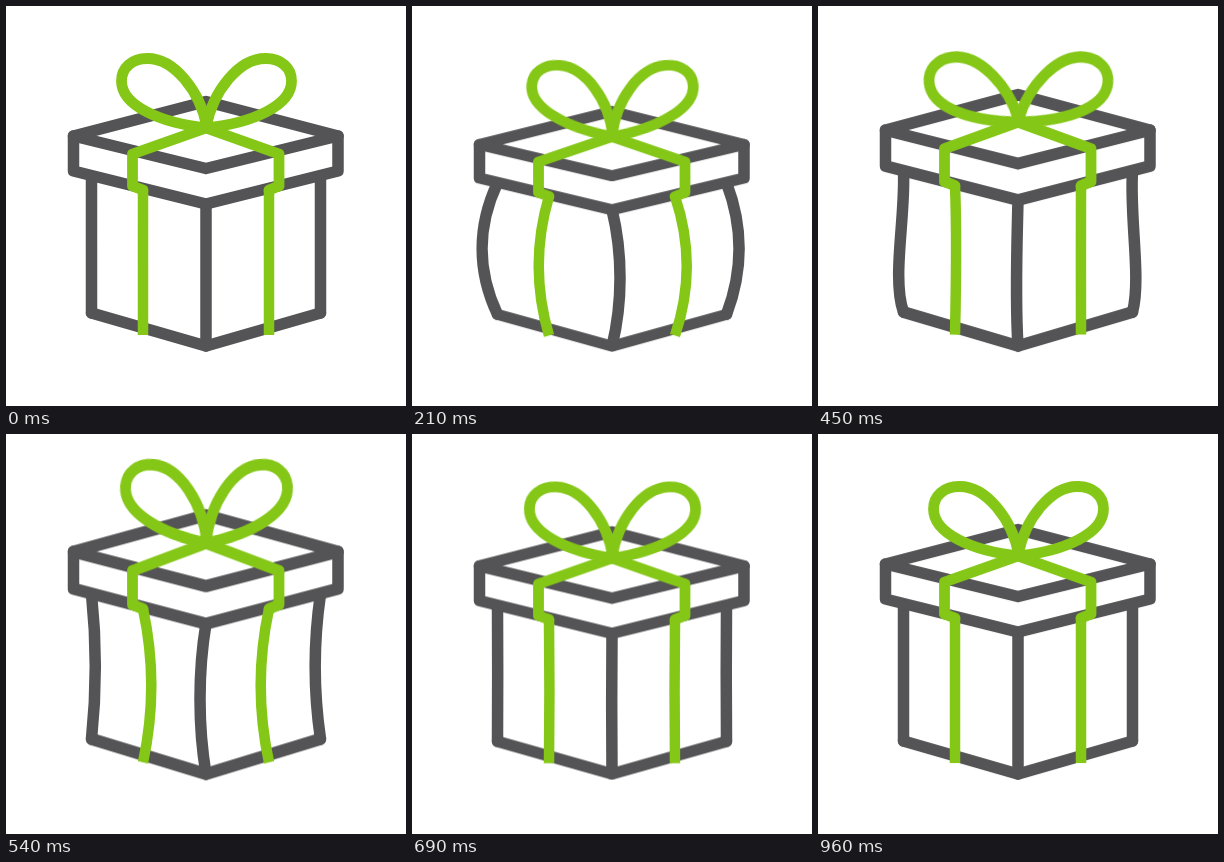
Recreate the animation shown at these times as an HTML page without scripts. Size 400 px wide and 400 px high, loop 990 ms.

```html
<!DOCTYPE html>
<html lang="en">
<head>
<meta charset="utf-8">
<title>Bouncing gift box</title>
<style>
  html, body { margin: 0; width: 100%; height: 100%; overflow: hidden; background: #fff; }
  svg { display: block; width: 100vw; height: 100vh; }

  path { fill: none; stroke: #545456; stroke-width: 11.5; stroke-linejoin: round; stroke-linecap: round; }
  .lid { fill: #fff; }
  .green path { stroke: #84c716; stroke-width: 10.8; }
  .green .strips { stroke-width: 10.5; stroke-linecap: butt; }

  .gift, .walls, .strips, .loop { animation: .99s ease-in-out infinite; }
  .gift { animation-name: squash; transform-origin: 200px 342px; }
  .walls { animation-name: walls; }
  .strips { animation-name: strips; }
  .loop {
    d: path("M201 121C194 85 168 52 141 52.5C126 52.5 115.5 62 115.5 75C115.5 100 155 117 201 122");
    animation-name: flap;
    transform-origin: 200.5px 121px;
  }

  @keyframes squash {
    0%, 100% { transform: scaleY(1); }
    30.3% { transform: scaleY(.951); }
    54.5% { transform: scaleY(1.058); }
    70.7% { transform: scaleY(.99); }
  }

  /* The loops lag behind the lid and swing about the knot. */
  @keyframes flap {
    0%, 100% { transform: rotate(0deg); }
    21.2% { transform: rotate(5deg); }
    45.5% { transform: rotate(-6deg); }
    55% { transform: rotate(4.7deg); }
    65% { transform: rotate(2.4deg); }
    78.8% { transform: rotate(2deg); }
  }

  @keyframes walls {
    0%, 72.7%, 100% { d: path("M85.5 170c0 45 0 92 0 137M200 198c0 45 0 97 0 142M314.5 170c0 45 0 92 0 137"); }
    24.2% { d: path("M85.5 170c-21 45 -21 92 0 137M200 198c11 45 11 97 0 142M314.5 170c17 45 17 92 0 137"); }
    33.3% {
      d: path("M85.5 170c-22 45 -22 92 0 137M200 198c11 45 11 97 0 142M314.5 170c18 45 18 92 0 137");
      animation-timing-function: ease-in;
    }
    45.5% {
      d: path("M85.5 170c2 45 -12 105 0 137M200 198c-1 45 -3 97 0 142M314.5 170c-3 45 9 105 0 137");
      animation-timing-function: ease-out;
    }
    54.5% { d: path("M85.5 170c5 45 5 92 0 137M200 198c-8 45 -8 97 0 142M314.5 170c-7 45 -7 92 0 137"); }
  }

  @keyframes strips {
    0%, 72.7%, 100% { d: path("M137 184c0 48 0 97 0 145M263 184c0 48 0 97 0 145"); }
    24.2% { d: path("M137 184c-14 48 -14 97 0 145M263 184c16 48 16 97 0 145"); }
    33.3% {
      d: path("M137 184c-14 48 -14 97 0 145M263 184c16 48 16 97 0 145");
      animation-timing-function: ease-in;
    }
    45.5% {
      d: path("M137 184c2 48 1 97 0 145M263 184c0 48 0 97 0 145");
      animation-timing-function: ease-out;
    }
    54.5% { d: path("M137 184c11 48 11 97 0 145M263 184c-11 48 -11 97 0 145"); }
  }
</style>
</head>
<body>
<svg viewBox="0 0 400 400">
  <g class="gift">
    <path d="M85.5 307L200 340L314.5 307"/>
    <path class="walls" d="M85.5 170c0 45 0 92 0 137M200 198c0 45 0 97 0 142M314.5 170c0 45 0 92 0 137"/>
    <path class="lid" d="M67.5 130L200 95.5L332 130V165L200 198L67.5 165Z"/>
    <path d="M67.5 130L200 162.5L332 130"/>
    <g class="green">
      <path class="strips" d="M137 184c0 48 0 97 0 145M263 184c0 48 0 97 0 145"/>
      <path d="M137 184L126.5 180V148L200 122L273 148V180L263 184"/>
      <path class="loop"/>
      <g transform="translate(401) scale(-1 1)"><path class="loop"/></g>
    </g>
  </g>
</svg>
</body>
</html>
```
